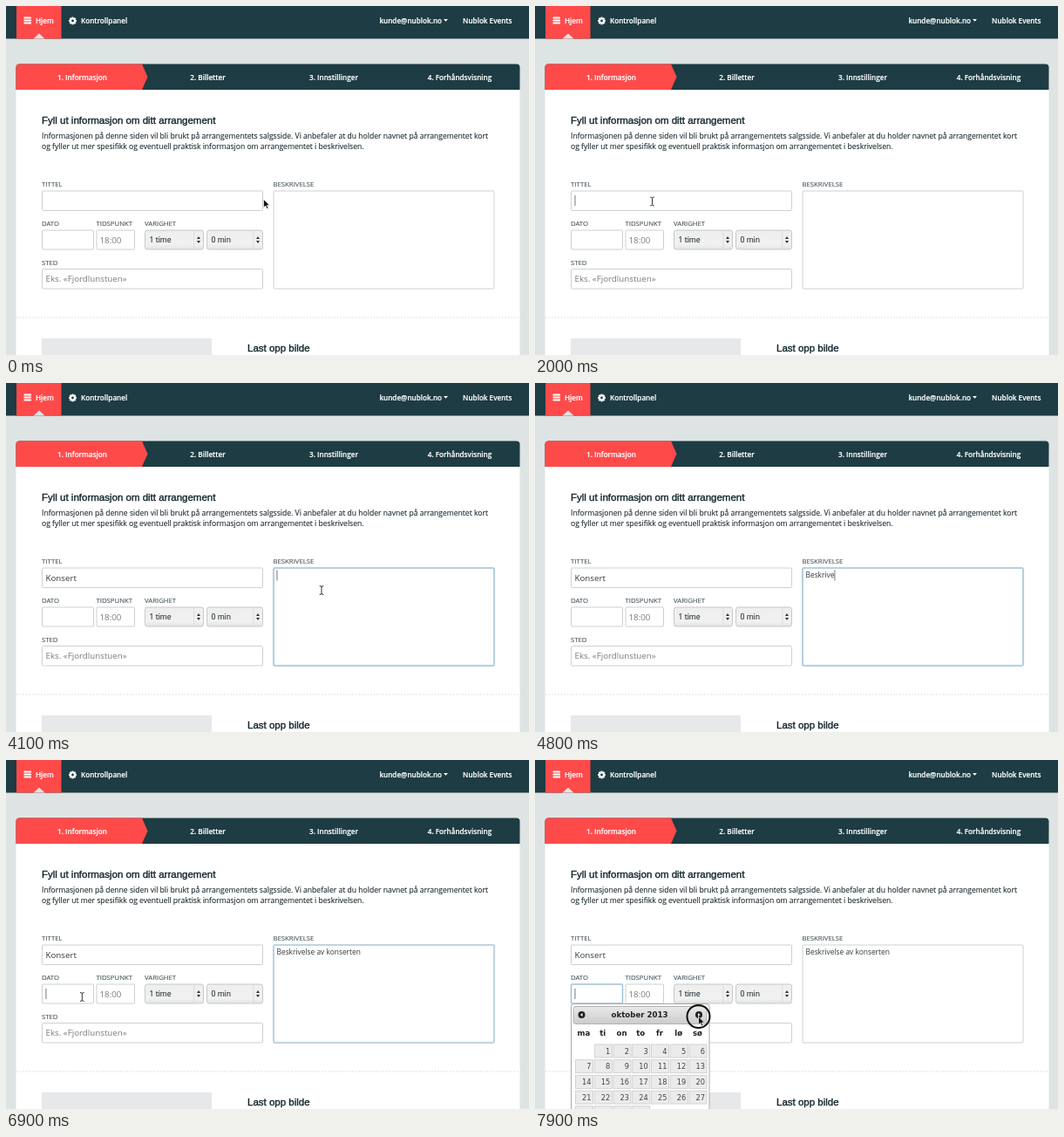
An HTML page that plays this animation: 600x400 px, repeating every 8 s.

```html
<!DOCTYPE html>
<html lang="no">
<head>
<meta charset="utf-8">
<title>Arrangement</title>
<style>
html, body { margin: 0; width: 100%; height: 100%; overflow: hidden; background: #dee4e3; }
svg { display: block; width: 600px; height: 400px; }
text { font-family: "Open Sans", "Noto Sans", sans-serif; font-size: 8.58px; fill: #1f2c32; stroke: #1f2c32; stroke-width: .12px; white-space: pre; }
.nav { font-weight: 600; font-size: 8.15px; fill: #fff; stroke: #fff; stroke-width: .2px; }
.head { font-family: "Liberation Sans", Arial, sans-serif; font-size: 11.5px; fill: #10242b; stroke: #10242b; stroke-width: .35px; }
.label { font-size: 7.75px; fill: #48555c; stroke: #48555c; }
.value { font-size: 9.75px; fill: #333c40; stroke: none; }
.hint { font-size: 9.75px; fill: #767b7e; stroke: none; }
.note { font-size: 8.38px; fill: #2f383c; stroke: none; }
.cal { font-family: "DejaVu Sans", Verdana, sans-serif; font-size: 8.2px; fill: #444; stroke: none; }
.calb { font-family: "DejaVu Sans", Verdana, sans-serif; font-size: 8.6px; font-weight: bold; fill: #222; stroke: none; }
</style>
</head>
<body>
<svg id="stage" viewBox="0 0 600 400">
  <defs>
    <linearGradient id="btn" x2="0" y2="1">
      <stop offset="0" stop-color="#eeeeee"/>
      <stop offset=".75" stop-color="#f1f1f1"/>
      <stop offset="1" stop-color="#e2e3e3"/>
    </linearGradient>
    <linearGradient id="bar" x2="0" y2="1">
      <stop offset="0" stop-color="#e9e9e9"/><stop offset="1" stop-color="#cbcbcb"/>
    </linearGradient>
  </defs>
</svg>
<script>
const LOOP = 8000;
const stage = document.getElementById('stage');

function add(tag, attrs, parent = stage) {
  const el = document.createElementNS('http://www.w3.org/2000/svg', tag);
  for (const key in attrs) el.setAttribute(key, attrs[key]);
  parent.appendChild(el);
  return el;
}
const box = (x, y, width, height, fill, more, parent) =>
  add('rect', { x, y, width, height, fill, ...more }, parent);
const shape = (d, fill, more, parent) => add('path', { d, fill, ...more }, parent);
function label(x, y, str, cls, anchor = 'start', parent) {
  const el = add('text', { x, y, class: cls, 'text-anchor': anchor }, parent);
  el.textContent = str;
  return el;
}

// Top bar
const DARK = '#1d3c43', RED = '#ff4a4a';
box(0, 0, 600, 37.5, DARK);
box(12, 0, 51.5, 37.5, RED);
shape('M31.5 37.5L38 31.5L44.5 37.5z', '#dee4e3');
for (const y of [12.5, 15.5, 18.5]) box(20.5, y, 8.5, 2.1, '#fff', { rx: .6 });
label(34, 20, 'Hjem', 'nav');
for (let a = 0; a < 180; a += 45)
  box(75.4, 12.6, 2.2, 8.8, '#fff', { transform: `rotate(${a} 76.5 17)` });
add('circle', { cx: 76.5, cy: 17, r: 3.2, fill: '#fff' });
add('circle', { cx: 76.5, cy: 17, r: 1.4, fill: DARK });
label(86, 20, 'Kontrollpanel', 'nav');
label(500, 20, 'kunde@nublok.no', 'nav', 'end');
shape('M502 15h5l-2.5 2.8z', '#fff');
label(580.5, 20, 'Nublok Events', 'nav', 'end');

// Panel and steps
box(11.5, 80, 578, 330, '#fff');
shape('M11.5 96V70.5q0-4 4-4H585.5q4 0 4 4V96z', DARK);
shape('M11.5 96V70.5q0-4 4-4H156l6.5 14.75L156 96z', RED);
['1. Informasjon', '2. Billetter', '3. Innstillinger', '4. Forhåndsvisning']
  .forEach((s, i) => label([87.5, 231.5, 376, 520.5][i], 85, s, 'nav', 'middle'));

label(41, 135.4, 'Fyll ut informasjon om ditt arrangement', 'head');
label(41, 152, 'Informasjonen på denne siden vil bli brukt på arrangementets salgsside. Vi anbefaler at du holder navnet på arrangementet kort');
label(41, 163.7, 'og fyller ut mer spesifikk og eventuell praktisk informasjon om arrangementet i beskrivelsen.');

// Form
const fields = {
  title: [41.5, 212, 253, 22.5],
  date: [41.5, 257, 59, 22],
  time: [104, 257, 43.5, 22],
  place: [41.5, 301.5, 253, 22.5],
  about: [307, 212, 253, 112]
};
const rings = {};
for (const name in fields) {
  const [x, y, w, h] = fields[name];
  box(x, y, w, h, '#fff', { stroke: '#cdd0d2', rx: 1 });
  const ring = rings[name] = add('g', { opacity: 0 });
  box(x, y, w, h, 'none', { stroke: '#b9dbea', 'stroke-width': 2.6, opacity: .4, rx: 2 }, ring);
  box(x, y, w, h, 'none', { stroke: '#9dbfd3', rx: 1 }, ring);
}
for (const [x, y, s] of [[41, 207, 'TITTEL'], [306.5, 207, 'BESKRIVELSE'], [41, 252, 'DATO'],
  [103.5, 252, 'TIDSPUNKT'], [159, 252, 'VARIGHET'], [41, 296.5, 'STED']]) label(x, y, s, 'label');
label(107.5, 271.5, '18:00', 'hint');
label(45.5, 316.3, 'Eks. «Fjordlunstuen»', 'hint');
for (const [x, w, s] of [[159.5, 67, '1 time'], [230.5, 64, '0 min']]) {
  const right = x + w;
  box(x, 257, w, 22, 'url(#btn)', { stroke: '#c6c9ca', rx: 2.5 });
  box(right - 11, 257.5, .7, 21, '#d3d5d6');
  label(x + 5, 271.2, s);
  shape(`M${right - 7.5} 267l2 -3l2 3zM${right - 7.5} 269l2 3l2 -3z`, '#333');
}
const title = label(45.5, 227, '', 'value');
const about = label(310.5, 223, '', 'note');

add('path', { d: 'M12 357H589', stroke: '#dcdfe0', 'stroke-dasharray': '2 1.5' });
box(41, 381, 195, 30, '#e6e8e9');
label(277, 396.2, 'Last opp bilde', 'head');
const caret = box(0, 0, .9, 12, '#666');

// Date picker
const picker = add('g', {});
box(41.5, 279.5, 158.5, 140, '#fff', { stroke: '#a8a8a8', rx: 3 }, picker);
box(44, 282.5, 153, 20, 'url(#bar)', { stroke: '#b2b2b2', rx: 3 }, picker);
label(120, 295.4, 'oktober 2013', 'calb', 'middle', picker);
for (const [x, dir] of [[53.5, -1], [188, 1]]) {
  add('circle', { cx: x, cy: 292, r: 4, fill: '#222' }, picker);
  shape(`M${x - dir} 290v4l${2.6 * dir} -2z`, '#fff', {}, picker);
}
const PITCH = 21.75;
['ma', 'ti', 'on', 'to', 'fr', 'lø', 'sø'].forEach((s, i) =>
  label(56 + i * PITCH, 316.2, s, 'calb', 'middle', picker));
for (let day = 1; day <= 31; day++) {
  const col = day % 7, row = Math.floor(day / 7);
  const x = 46.5 + col * PITCH, y = 326 + row * 17.7;
  box(x, y, 20, 15, '#ebebeb', { stroke: '#cfcfcf', 'stroke-width': .9 }, picker);
  label(x + 18, y + 10.6, day, 'cal', 'end', picker);
}

// Pointer
const pointer = add('g', {});
const halo = add('circle', { r: 13, fill: 'none', stroke: '#111', 'stroke-width': 2 }, pointer);
const arrow = shape('M0 0V9.5L2.3 7.5L3.9 11L5.5 10.3L4 7H7z', '#111',
  { stroke: '#fff', 'stroke-width': .7 }, pointer);
const beam = add('g', { fill: 'none' }, pointer);
for (const [stroke, width] of [['#fff', 2.2], ['#333', 1]])
  add('path', { d: 'M-2.3 -5Q0 -5 0 -3.5Q0 -5 2.3 -5M0 -3.5V3.5M-2.3 5Q0 5 0 3.5Q0 5 2.3 5', stroke, 'stroke-width': width }, beam);

// Time, x, y
const path = [
  [900, 295.5, 221.5], [1200, 250, 225], [1300, 250, 225], [1600, 140, 224], [1800, 134.5, 224],
  [3300, 134.5, 224], [3900, 362, 237.5], [6100, 362, 237.5], [6700, 87.3, 271.5],
  [7000, 87.3, 271.5], [7800, 187.5, 294]
];
const clicks = [[1800, 2000], [3900, 4100], [6700, 6900], [7900, 8000]];
const typing = [[2400, 3400], [4300, 6200]];
const titleKeys = [2500, 2600, 2700, 2800, 2900, 3100, 3300];

const within = (list, t) => list.some(([a, b]) => t >= a && t < b);
const ramp = (t, from, to) => Math.min(1, Math.max(0, (t - from) / (to - from)));
const show = (el, on) => el.setAttribute('visibility', on ? 'inherit' : 'hidden');

function pointerAt(t) {
  let [, x, y] = path[0];
  for (let i = 1; i < path.length; i++) {
    const [t0, x0, y0] = path[i - 1], [t1, x1, y1] = path[i];
    if (t < t0) break;
    const k = ramp(t, t0, t1), e = k * k * (3 - 2 * k);
    x = x0 + (x1 - x0) * e;
    y = y0 + (y1 - y0) * e;
  }
  return [x, y];
}

function drawCaret(t) {
  let x = 45.5, y = 217, since = 2000;
  if (t >= 6900) {
    y = 262;
    since = 6900;
  } else if (t >= 4100) {
    x = 310.5 + about.getComputedTextLength();
    y = 214.5;
    since = t < 4300 ? 4100 : Math.min(t, 6000);
  } else {
    x += title.getComputedTextLength();
    if (t >= 2400) since = Math.min(t, 3300);
  }
  caret.setAttribute('x', x);
  caret.setAttribute('y', y);
  show(caret, t >= 2000 && !(t >= 3900 && t < 4100) && (t - since) % 1000 < 500);
}

function draw(time) {
  const t = Math.floor(time / 100) * 100;
  title.textContent = 'Konsert'.slice(0, titleKeys.filter(k => t >= k).length);
  about.textContent = 'Beskrivelse av konserten'.slice(0, Math.max(0, Math.floor((t - 4200) * 19 / 1400)));
  rings.title.setAttribute('opacity', ramp(t, 2000, 2200) - ramp(t, 3900, 4100));
  rings.about.setAttribute('opacity', ramp(t, 3900, 4100) - ramp(t, 6850, 7100));
  rings.date.setAttribute('opacity', ramp(t, 6900, 7150));
  drawCaret(t);

  const open = ramp(t, 6900, 7200);
  picker.setAttribute('opacity', open);
  show(picker, open > 0);

  const [x, y] = pointerAt(t);
  const inField = Object.values(fields).some(([fx, fy, w, h]) => x > fx && x < fx + w && y > fy && y < fy + h);
  const overPicker = open > 0 && y > 279;
  const text = inField && !overPicker;
  pointer.setAttribute('transform', `translate(${x} ${y})`);
  show(pointer, !within(typing, t));
  show(beam, text);
  show(arrow, !text);
  show(halo, within(clicks, t));
}

const start = performance.now();
function tick() {
  draw((performance.now() - start) % LOOP);
  requestAnimationFrame(tick);
}
tick();
</script>
</body>
</html>
```
